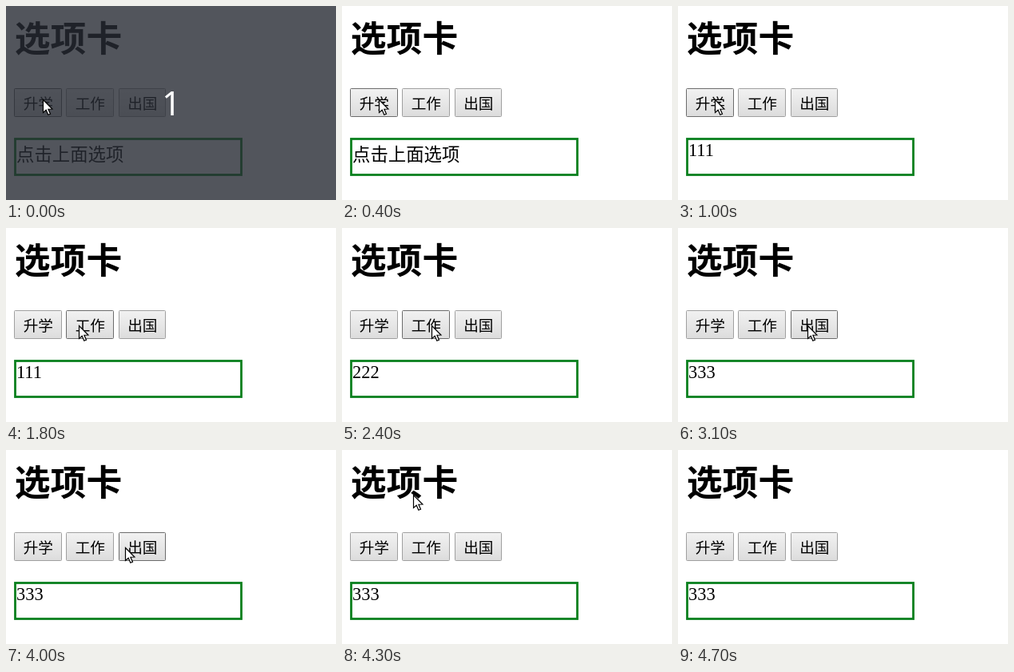
Recreate the animation shown at these times as an HTML page with a canvas. Size 413 by 243 pixels, loop 5.1 s.

```html
<!DOCTYPE html>
<html lang="zh-CN">
<head>
<meta charset="utf-8">
<title>选项卡</title>
<style>
  html, body { margin: 0; width: 100%; height: 100%; overflow: hidden; background: #fff; }
  canvas { display: block; }
</style>
</head>
<body>
<canvas id="stage" width="413" height="243"></canvas>
<script>
const ctx = document.getElementById('stage').getContext('2d');
const LOOP = 5100;
const STEP = 100;
const CJK = '"Noto Sans CJK SC", "Noto Sans CJK", sans-serif';
const SERIF = '"Liberation Serif", serif';
const ARROW = new Path2D('M0 0V16L3.7 12.7 6.3 18.8 9 17.7 6.4 11.7 11.4 11.5Z');
const TAB_TOP = 103;
const TAB_HEIGHT = 36;

const tabs = ['升学', '工作', '出国'].map((label, i) => {
  const x = Math.round(10 + 65.3 * i);
  return { label, x, w: 70 + 65 * i - x, text: String(i + 1).repeat(3) };
});

// The pointer glides in a straight line during each move and rests between them
const moves = [
  { from: 1500, to: 1600, x: 70, y: 122 },
  { from: 1700, to: 1900, x: 113, y: 123 },
  { from: 2400, to: 2600, x: 163, y: 123 },
  { from: 3900, to: 4000, x: 150, y: 123 },
  { from: 4000, to: 4500, x: 50, y: 13 },
  { from: 4500, to: 4700, x: 46, y: -22 }
];

const clicks = [
  { tab: tabs[0], down: 900, up: 1000 },
  { tab: tabs[1], down: 1900, up: 2100 },
  { tab: tabs[2], down: 3000, up: 3100 }
];

function pointerAt(t) {
  let x = 47, y = 118;
  for (const move of moves) {
    const k = Math.min(1, Math.max(0, (t - move.from) / (move.to - move.from)));
    x += (move.x - x) * k;
    y += (move.y - y) * k;
  }
  return { x, y };
}

function isOver(tab, { x, y }) {
  return x >= tab.x && x < tab.x + tab.w && y >= TAB_TOP && y < TAB_TOP + TAB_HEIGHT;
}

function write(text, x, y, font, color = '#000', align = 'left') {
  ctx.font = font;
  ctx.fillStyle = color;
  ctx.textAlign = align;
  ctx.fillText(text, x, y);
}

function drawTab({ label, x, w }, hovered, pressed) {
  const fill = ctx.createLinearGradient(0, TAB_TOP, 0, TAB_TOP + TAB_HEIGHT);
  fill.addColorStop(0, pressed ? '#e4e4e4' : '#f2f2f2');
  fill.addColorStop(1, pressed ? '#d2d2d2' : '#dcdcdc');
  ctx.beginPath();
  ctx.roundRect(x + 0.5, TAB_TOP + 0.5, w - 1, TAB_HEIGHT - 1, 1);
  ctx.fillStyle = fill;
  ctx.fill();
  ctx.lineWidth = 1;
  ctx.strokeStyle = hovered ? '#6c6c6c' : '#a0a0a0';
  ctx.stroke();
  write(label, x + w / 2 + 0.3, 129, '18.67px ' + CJK, '#000', 'center');
}

function drawPanel(text) {
  ctx.lineWidth = 2.8;
  ctx.strokeStyle = '#0a801e';
  ctx.strokeRect(11.5, 166.5, 283, 45);
  if (text) write(text, 13, 188, '22.4px ' + SERIF);
  else write('点击上面选项', 13, 194, '22.4px ' + CJK);
}

function drawCountdown() {
  ctx.fillStyle = 'rgba(39, 43, 52, 0.8)';
  ctx.fillRect(0, 0, 413, 243);
  write('1', 207, 137, '41px "Noto Sans", sans-serif', '#fff', 'center');
}

function drawPointer({ x, y }) {
  ctx.save();
  ctx.translate(Math.round(x) - 0.5, Math.round(y) - 0.5);
  ctx.fillStyle = '#fff';
  ctx.fill(ARROW);
  ctx.lineWidth = 1.2;
  ctx.strokeStyle = '#000';
  ctx.stroke(ARROW);
  ctx.restore();
}

function draw(t) {
  const pointer = pointerAt(t);
  const held = clicks.find(c => t >= c.down && t < c.up);
  const done = clicks.findLast(c => t >= c.up);

  ctx.fillStyle = '#fff';
  ctx.fillRect(0, 0, 413, 243);
  write('选项卡', 10.8, 57, 'bold 44.8px ' + CJK);
  for (const tab of tabs) drawTab(tab, isOver(tab, pointer), held?.tab === tab);
  drawPanel(done?.tab.text);
  if (t < 400) drawCountdown();
  drawPointer(pointer);
}

const start = performance.now();
function tick() {
  const t = (performance.now() - start) % LOOP;
  draw(Math.floor(t / STEP) * STEP);
  requestAnimationFrame(tick);
}
tick();
</script>
</body>
</html>
```
